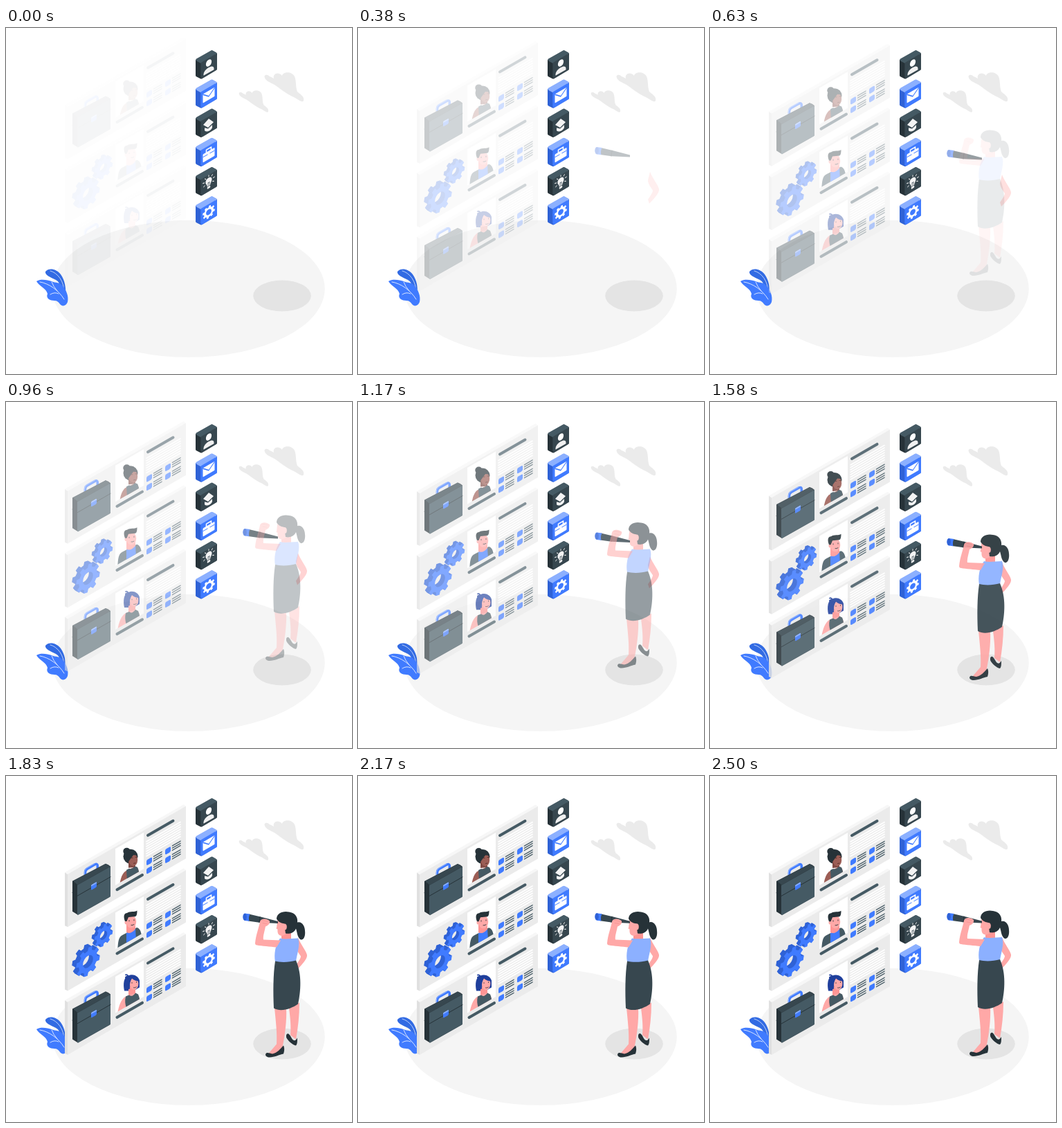
An HTML page for the animation above (2540 ms loop, 500 by 500 pixels).

```html
<!DOCTYPE html>
<html lang="en">
<head>
<meta charset="utf-8">
<title>Candidate search</title>
<style>
html, body { margin: 0; width: 100%; height: 100%; overflow: hidden; background: #fff; }
svg { display: block; width: 100vw; height: 100vh; }
</style>
</head>
<body>
<svg id="stage" viewBox="0 0 500 500"></svg>
<script>
const INK = '#263238', SLATE = '#37474f', STEEL = '#455a64';
const BLUE = '#407bff', PALE = '#8cb0ff', DEEP = '#2f62d6', NAVY = '#1f3f9c', SKIN = '#ffa8a7';
const LOOP = 2540, ROW = 92.3, TILE_STEP = 42.2;

const path = (d, fill, extra = '') => `<path d="${d}" fill="${fill}" ${extra}/>`;
const line = (d, color, width = 1) =>
  path(d, 'none', `stroke="${color}" stroke-width="${width}" stroke-linecap="round" stroke-linejoin="round"`);
const oval = (x, y, rx, ry, fill) => `<ellipse cx="${x}" cy="${y}" rx="${rx}" ry="${ry}" fill="${fill}"/>`;
const move = (x, y, body) => `<g transform="translate(${x} ${y})">${body}</g>`;
const skew = (x, y, body) => `<g transform="translate(${x} ${y}) skewY(-30)">${body}</g>`;
const box = (x, y, w, h, fill, r = 0) =>
  `<rect x="${x}" y="${y}" width="${w}" height="${h}" rx="${r}" fill="${fill}"/>`;
const layer = (name, body) => `<g class="${name}">${body}</g>`;
const repeat = (n, make) => Array.from({ length: n }, (_, i) => make(i)).join('');

function gearPath(radius, hole, teeth = 8) {
  const points = [];
  for (let i = 0; i < teeth; i++) {
    for (const [shift, r] of [[-.29, .77], [-.2, 1], [.2, 1], [.29, .77]]) {
      const a = (i + shift) / teeth * 2 * Math.PI + .2;
      points.push(`${(Math.cos(a) * r * radius).toFixed(2)} ${(Math.sin(a) * r * radius).toFixed(2)}`);
    }
  }
  return `M${points.join('L')}ZM${hole} 0A${hole} ${hole} 0 1 0 ${-hole} 0A${hole} ${hole} 0 1 0 ${hole} 0Z`;
}

function gear(x, y, radius, hole, depth) {
  const d = gearPath(radius, hole);
  const slice = (k, color) =>
    `<g transform="matrix(.866 -.5 0 1 ${x - k} ${y - k * .577})">${path(d, color, 'fill-rule="evenodd"')}</g>`;
  return repeat(depth * 2, i => slice(depth - i / 2, DEEP)) + slice(0, BLUE);
}

function tile(index, icon) {
  const [front, top, side] = index % 2 ? [BLUE, PALE, DEEP] : [SLATE, STEEL, INK];
  const solid = (d, c) => path(d, c, `stroke="${c}" stroke-width="4" stroke-linejoin="round"`);
  return move(0, index * TILE_STEP,
    solid('M276 47L297.5 34.5L303 37.5V59L282 71.5L276 68.5Z', side) +
    solid('M276.5 46L297.5 34.2L302.5 37L282 49Z', top) +
    solid('M283.3 51.5L303 40V59L283.3 70.8Z', front) +
    skew(293, 55, icon));
}

const icons = [
  oval(0, -4.5, 4.1, 4.8, '#fff') + path('M-7.5 9.5V8C-7.5 4 -4 2 0 2S7.5 4 7.5 8V9.5Z', '#f1f1f1'),
  box(-8.5, -6.5, 17, 13, '#fff', 1) + line('M-8 -5.5L0 1.5L8 -5.5', BLUE, 1.3),
  path('M-8 -4L0 -8.4L7 .6L-1 4Z', '#f4f4f4') + path('M-6 1.5L-1 5.5L5 3.5V7.5C3 11 -3 10 -6 5.5Z', '#f4f4f4'),
  box(-8.5, -4, 17, 12, '#fff', 1) + line('M-3.5 -4V-7.5H3.5V-4', '#fff', 1.6) +
    line('M-8 .3H8', BLUE, 1) + box(-1.5, -.6, 3, 2.2, '#fff'),
  path('M-2.3 4C-2.3 1 -4.6 0 -4.6 -3A4.6 4.6 0 0 1 4.6 -3C4.6 0 2.3 1 2.3 4Z', '#f4f4f4') +
    box(-2.2, 4.8, 4.4, 3.2, '#f4f4f4', 1) + line('M-1 3V-1L0 0L1 -1V3', SLATE, .6) +
    repeat(7, i => `<g transform="translate(0 -2.5) rotate(${i * 40 - 120})">${line('M0 -6.5V-8.5', '#f4f4f4', 1)}</g>`),
  path(gearPath(9, 3.9), '#fff', 'fill-rule="evenodd"')
];

const cloud = path('M374 72C372 68 377 66 381 70Q384 71 387 73C385 67 393 62 399 69' +
  'C400 63 413 62 417 70C420 77 418 84 421 92C424 95 432 99 430 105C428 109 421 102 416 100' +
  'C405 95 394 86 388 82C382 79 375 76 374 72Z', '#ebebeb');

const plant =
  path('M57 352C62 346 73 348 79 356C85 364 87 376 86 386L79 384C77 376 80 368 72 364C64 360 56 357 57 352Z', '#326be3') +
  line('M64 351C75 354 84 366 84 382', '#dce7ff', .8) +
  path('M44 366C50 362 60 364 66 366C72 369 77 366 83 374C87 379 91 388 89 396C87 402 81 403 78 399' +
    'C76 396 74 394 70 394C64 394 57 391 60 384C58 376 48 373 44 366Z', BLUE) +
  line('M49 367C62 369 76 379 84 392M64 385Q70 381 76 384M66 367Q68 373 74 380', '#fff', .8);

function panelBase() {
  const details = (x, y) => skew(x, y,
    box(-4, -4, 8, 8, BLUE, 2) + line('M6.5 -3.2H18M6.5 0H18M6.5 3.2H18', STEEL, 1.5));
  return path('M85 139.5L89.5 142V218.5L85 216.5Z', '#e0e0e0') +
    path('M85 139.5L256.5 41.5L260 43.8L89 142.5Z', '#f7f7f7') +
    path('M89 142.3L260 43.8V119.5L89 218.5Z', '#ebebeb') +
    path('M158 105.5L199 82V134.5L158 158Z', '#fff') +
    line('M160.5 164.4L197 143.3', STEEL, 4) +
    line('M205 86L241.5 65', STEEL, 4) +
    repeat(7, i => line(`M203 ${95 + i * 3.5}L252 ${66.7 + i * 3.5}`, '#fff', 1.7)) +
    details(207, 123.5) + details(207, 136) + details(234, 108) + details(234, 120.5);
}

const briefcase =
  line('M114.5 147V139.5Q114.5 136 117.5 134.3L128.5 128Q132.3 126.5 132.3 130V137', BLUE, 3.6) +
  line('M113.3 144V139Q113.5 135.5 116.5 133.3L128 126.8', PALE, 1.1) +
  path('M96 152L144 127Q148 128 151 131V173Q151 174.5 150 175L104 201L96 196Z', INK) +
  path('M97 152L144 127L150.5 131L103.5 157.5Z', SLATE) +
  path('M103 158L151 131V173Q151 174.5 150 175L104 201Q103 201 103 200Z', STEEL) +
  line('M96 169L103 173.5L151 146', INK, 1) +
  skew(127, 159.5, box(-4, -4, 8, 7.5, BLUE, 1.5)) +
  skew(127, 159.5, box(-4, -4, 8, 2, PALE, 1));

const portraits = [
  oval(174.5, 109, 5.2, 5, INK) + oval(180, 116.5, 10.5, 10.5, INK) +
    path('M177 119V133L187 132V126Z', '#824a44') + oval(184, 121.5, 6.2, 8.8, '#9c5d55') +
    path('M173 112C178 108 187 107 190.5 115L184 114.5L177 124Z', INK) +
    path('M164 160C165 149 168 140 174 137L187 131C191 132 193 138 192 146L175 158Z', '#9c5d55') +
    path('M174 136L178 134Q182 136 186 131L190 132Q193 139 192 146L175 153Z', STEEL) +
    line('M187 117.5H189M181 118.5H183M184.5 126.5L187 126', '#4a2723', .8),
  path('M161 162C162 149 162 141 168 138L189 127C195 128 196 137 197 146Z', STEEL) +
    path('M174 135L187 128L188 146L174 154Z', BLUE) +
    path('M174 122V134Q181 137 187 129V121Z', '#ff9594') + oval(181, 118.5, 7.2, 9.5, SKIN) +
    oval(173.5, 119.5, 2, 2.8, SKIN) +
    path('M172 118C169 110 171 106 175 106C179 103 186 105 189.5 102.5C189.5 107 189 110 187 111L177 112L174.5 118Z', INK) +
    line('M178 116.5V117.8M185 115.5V116.8M181 123.5Q183 124 185 122.5', INK, .9),
  path('M171 126C169 116 170 106 177 104C183 101 191 104 193 111V121L184 126Z', NAVY) +
    line('M176 105Q171 106 174 108M177 105Q175 102 173 103', NAVY, 1.8) +
    path('M177 119V134L187 131V122Z', '#ff9594') + oval(185, 115.5, 6.4, 9, SKIN) +
    path('M173 113C176 104 190 102 192.5 112Q186 112 182 108Q178 114 179 123L173 125Z', NAVY) +
    path('M161 159C163 148 166 138 173 134L187 129C192 131 194 137 193 145L174 155Z', SKIN) +
    path('M173 134L178 132Q182 136 187 129L191 131Q194 138 193 145L174 151Q171 142 173 134Z', STEEL) +
    line('M182 114V115M188.5 113V114M184.5 121.5Q187 122 188.5 120.5', INK, .8)
];

const panels = repeat(3, i => move(0, i * ROW,
  panelBase() +
  (i === 1 ? move(0, -ROW, gear(141, 230.5, 15.5, 6, 4) + gear(118.5, 268.5, 20, 8.5, 6)) : briefcase) +
  `<g clip-path="url(#photo)">${portraits[i]}</g>`));

const restingArm = path('M422 233C426 243 433 251 435 258C436 263 428 272 421 279L419 273C424 266 426 262 426 260C422 254 419 250 419 245Z', SKIN);

const body =
  path('M409 334C411 350 412 360 411 373L419 379C422 362 424 345 424 326Z', SKIN) +
  path('M388 333C390 355 392 370 391 386L379 400L390 402L399 393C403 375 406 350 405 335Z', SKIN) +
  path('M405 373C407 368 410 372 412 376C415 382 418 382 421 377C421 382 421 386 419 388C414 387 407 381 405 376Z', INK) +
  path('M375 401C376 397 380 399 385 400C392 399 397 392 401 388C403 392 402 397 401 400C395 401 388 405 381 405C377 405 375 403 375 401Z', INK) +
  path('M398 222L412 220V236L398 236Z', '#ff9594') +
  path('M396 233C404 235 412 233 422 233C426 242 420 257 419 267C409 269 396 269 389 267C387 257 389 242 396 233Z', PALE) +
  path('M389 266C386 285 386 310 387 334C397 340 412 335 422 328C426 310 428 285 419 265C409 268 396 268 389 266Z', SLATE) +
  path('M393 204C391 211 392 216 390.5 219L392.5 220C392 226 394 229.5 399 229.5L407 226L411 207Z', SKIN) +
  path('M391 205C391 197 400 193 409 195C418 196 422 203 421 210C428 208 432 216 432 222C433 230 430 236 426 235' +
    'C421 232 421 225 419 219C416 226 409 227 404 226L402 212C398 211 394 210 391 205Z', INK) +
  oval(402.5, 216.5, 3.3, 4.6, SKIN);

const telescope =
  path('M351 199L368 203L393 209.5V212.5L366 211.3L350 209Z', SLATE) +
  line('M367 203L366 211', INK, 1) +
  path('M345 198L352.5 199Q350 204 351.5 209.3L345 208.5C341 206 342 199 345 198Z', BLUE) +
  oval(345.2, 203.2, 2.6, 5, DEEP);

const raisedArm = path('M360 240C361 228 366 216 367 209C368 204 377 204 381 208C382 212 378 215 375 216' +
  'C374 222 371 230 372 235L397 236L391 246C382 245 369 244 363 243C361 243 360 242 360 240Z', SKIN) +
  line('M370 207L378 208.5M371 211L377 212', '#f28f8f', .7);

const stage = document.getElementById('stage');
stage.innerHTML =
  '<defs><clipPath id="photo"><path d="M158 105.5L199 82V134.5L158 158Z"/></clipPath></defs>' +
  oval(263.7, 376.8, 197, 99, '#f5f5f5') +
  oval(399, 387, 41.8, 22.5, '#e4e4e4') +
  cloud + `<g transform="translate(337 90) scale(.75) translate(-374 -64)">${cloud}</g>` +
  plant +
  layer('panels', panels) +
  icons.map((icon, i) => tile(i, icon)).join('') +
  layer('tool', restingArm) + layer('body', body) +
  layer('scope', telescope) + layer('body', raisedArm);

// Each track lists [time, value] pairs joined by straight lines.
const tracks = {
  panels: { y: [[0, -28.5], [1845, 0]], alpha: [[0, .05], [1845, 1]] },
  body: {
    y: [[400, -58], [630, -47], [960, -31], [1380, -10], [1580, -3], [1830, 1.5], [1960, 2.3], [2500, 0]],
    alpha: [[450, 0], [630, .1], [960, .31], [1380, .74], [1580, .92], [1750, 1]]
  },
  tool: {
    y: [[0, -32], [630, -21], [960, -14.5], [1380, -5], [1580, -1.5], [1830, .5], [2300, 0]],
    alpha: [[130, 0], [630, .36], [960, .5], [1380, .8], [1700, 1]]
  },
  scope: {
    y: [[0, -32], [630, -22], [960, -15], [1380, -4], [1580, -1], [1830, .5], [2300, 0]],
    alpha: [[0, 0], [630, .52], [960, .68], [1380, .92], [1580, 1]]
  }
};

function valueAt(track, t) {
  const next = track.findIndex(([time]) => time > t);
  if (next === 0) return track[0][1];
  if (next < 0) return track[track.length - 1][1];
  const [t0, v0] = track[next - 1], [t1, v1] = track[next];
  return v0 + (v1 - v0) * (t - t0) / (t1 - t0);
}

function draw(now) {
  const t = now % LOOP;
  for (const [name, { y, alpha }] of Object.entries(tracks)) {
    for (const node of stage.querySelectorAll('.' + name)) {
      node.setAttribute('transform', `translate(0 ${valueAt(y, t).toFixed(2)})`);
      node.setAttribute('opacity', valueAt(alpha, t).toFixed(3));
    }
  }
  requestAnimationFrame(draw);
}
draw(performance.now());
</script>
</body>
</html>
```
